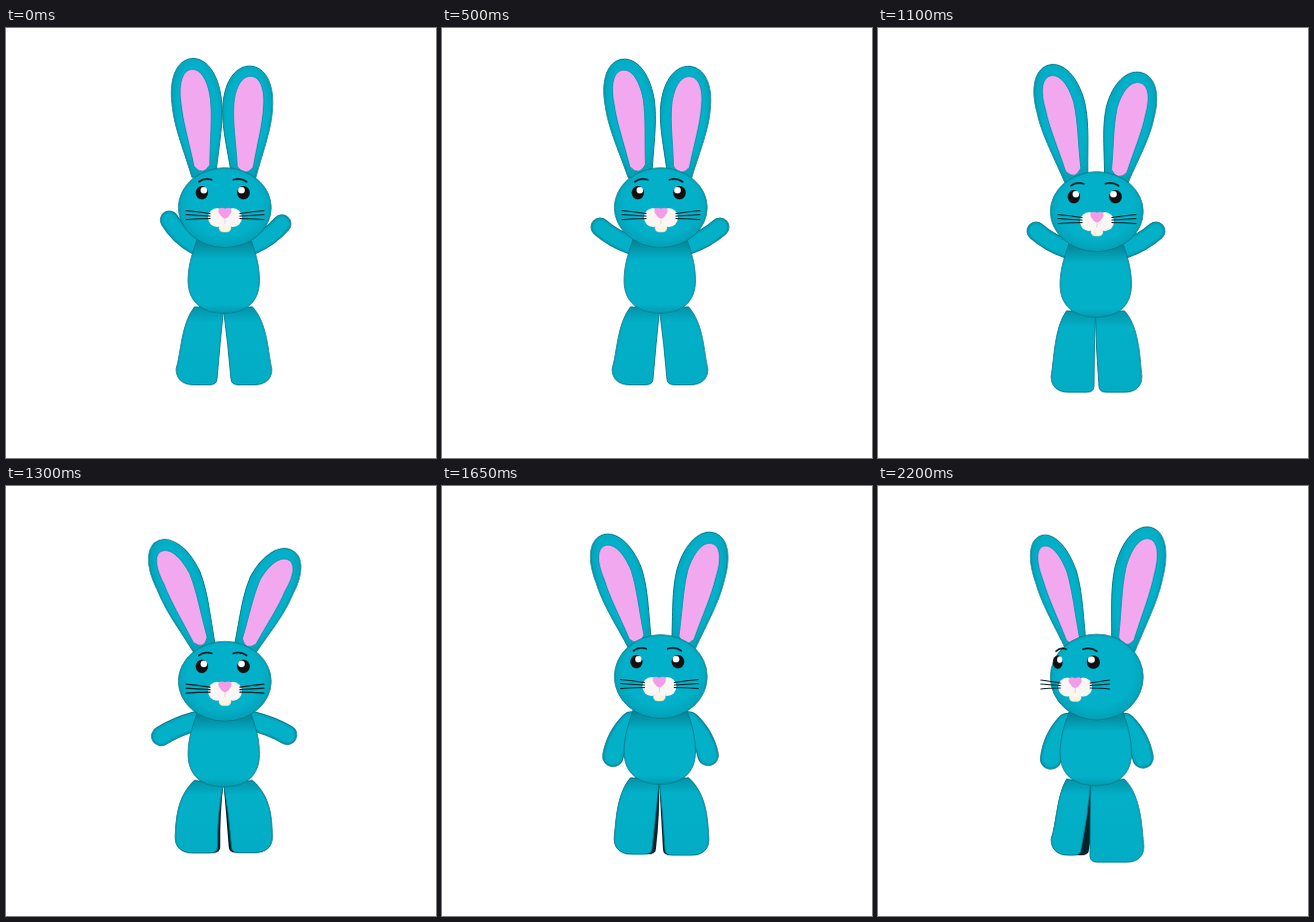
Recreate the animation shown at these times as an HTML page. Size 432 by 432 pixels, loop 3 s.

```html
<!DOCTYPE html>
<html lang="en">
<head>
<meta charset="utf-8">
<title>Plush rabbit</title>
<style>
  html, body { margin: 0; width: 100%; height: 100%; overflow: hidden; background: #fff; }
  svg { display: block; width: 100vw; height: 100vh; }
  .fur { stroke: #067a8b; stroke-width: .9; }
  .line { fill: none; stroke: #0b1c22; stroke-linecap: round; }
</style>
</head>
<body>
<svg viewBox="0 0 432 432" xmlns="http://www.w3.org/2000/svg">
  <defs>
    <radialGradient id="round" cx=".5" cy=".45" r=".56">
      <stop offset=".7" stop-color="#02b1c9"/><stop offset="1" stop-color="#039fb5"/>
    </radialGradient>
    <linearGradient id="under" x2="0" y2="1">
      <stop offset="0" stop-color="#057f92"/><stop offset=".27" stop-color="#02b0c8"/>
      <stop offset=".88" stop-color="#02b0c8"/><stop offset="1" stop-color="#039ab0"/>
    </linearGradient>
    <linearGradient id="leg" x2="0" y2="1">
      <stop offset="0" stop-color="#0492a7"/><stop offset=".2" stop-color="#02b0c8"/>
      <stop offset="1" stop-color="#02acc4"/>
    </linearGradient>
  </defs>
  <g id="rabbit"></g>
</svg>
<script>
const LOOP = 3000, STEP = 50, LAST = 2200;
const TIMES = [0, 500, 900, 1100, 1500, 1650, 1900, 2200];

// Shorter tracks belong to the last times and hold still before them.
const tracks = {
  drop:   [0, 4, 24.5, 13, 13.5, 14.5],
  headRy: [40, 40, 40, 42, 43, 43],
  yaw:    [0, 0, 0, -2, -9, -28],
  earL:   [-5.5, -8, -5.5, -12, -26.5, -17, -15.5, -16],
  earR:   [3.2, 4.8, 3.2, 11.5, 29.5, 13.5, 12.5, 11.5],
  earX:   [239, 240, 242, 243, 245, 247],
  earLen: [108, 108, 107, 116, 121, 122],
  armL:   [44, 30, 44, 30, -66, -62, -60, -65],
  armR:   [36, 30, 36, 30, -68, -60, -58, -62]
};
const legs = {
  left: {
    foot:  [171, 174, 166, 173, 175, 174],
    knee:  [176, 177, 165, 175, 177, 179.5],
    heel:  [212, 217, 208, 211, 211, 204],
    thigh: [215, 217, 207, 215, 218, 211],
    floor: [358.5, 366, 370, 370, 371, 371],
    shade: [0, 0, 5.5, 4, 6, 8]
  },
  right: {
    foot:  [267, 265, 270, 268, 269, 267],
    knee:  [263, 263, 271, 267, 268, 265],
    heel:  [226, 222, 231, 224, 221, 213],
    thigh: [223, 219, 229, 222, 221, 213],
    floor: [358.5, 366, 370, 371, 373, 378],
    shade: [0, 0, -5.5, -2, 0, 0]
  }
};

// Smooth interpolation that never overshoots its keys.
function sample(values, t) {
  const times = TIMES.slice(-values.length), last = values.length - 1;
  if (t <= times[0]) return values[0];
  if (t >= times[last]) return values[last];
  const slope = i => (values[i + 1] - values[i]) / (times[i + 1] - times[i]);
  const tangent = i => {
    if (i === 0 || i === last) return 0;
    const a = slope(i - 1), b = slope(i);
    return a * b > 0 ? 2 * a * b / (a + b) : 0;
  };
  const i = times.findIndex((_, k) => t < times[k + 1]);
  const h = times[i + 1] - times[i], u = (t - times[i]) / h, v = 1 - u;
  return values[i] * (1 + 2 * u) * v * v + values[i + 1] * u * u * (3 - 2 * u)
    + h * (tangent(i) * u * v * v - tangent(i + 1) * u * u * v);
}
const poseOf = (set, t) =>
  Object.fromEntries(Object.entries(set).map(([name, values]) => [name, sample(values, t)]));

const rad = deg => deg * Math.PI / 180;
const path = (d, attrs) => `<path d="${d}" ${attrs}/>`;
const ellipse = (x, y, rx, ry, attrs) => `<ellipse cx="${x}" cy="${y}" rx="${rx}" ry="${ry}" ${attrs}/>`;

// A leaning ear narrows and its tip bends outwards.
function ear(x, y, angle, len, shift, turn) {
  const squash = Math.cos(rad(angle)) * turn, tip = angle * .2, bow = tip * .6;
  const outer = `M-12 4C-19 ${-.26 * len} -25 ${-.42 * len} -25 ${-.62 * len}
    C${bow - 25} ${-.86 * len} ${tip - 14} ${-len} ${tip} ${-len}
    S${bow + 25} ${-.86 * len} 25 ${-.62 * len}C25 ${-.42 * len} 19 ${-.26 * len} 12 4Z`;
  const inner = `M-8 ${-.06 * len}C-11 ${-.3 * len} -15 ${-.45 * len} -15 ${-.63 * len}
    C${bow - 15} ${-.8 * len} ${tip - 9} ${-.905 * len} ${tip} ${-.905 * len}
    S${bow + 15} ${-.8 * len} 15 ${-.63 * len}C15 ${-.45 * len} 11 ${-.3 * len} 8 ${-.06 * len}Q0 ${.04 * len} -8 ${-.06 * len}Z`;
  return `<g transform="translate(${x} ${y}) rotate(${angle}) scale(${squash} 1)">
    ${path(outer, 'class="fur" fill="url(#round)"')}
    ${path(inner, `transform="translate(${shift})" fill="#f2a8ee" stroke="#0590a6" stroke-width=".8"`)}</g>`;
}

function arm(x, y, angle, side) {
  const s = Math.sin(rad(angle)), c = Math.cos(rad(angle)), low = Math.max(0, -s);
  const len = 36 + 3 * low, width = 18 + 3 * low, bend = 7 * s, top = y + 7 * low;
  const hx = x + side * c * len, hy = top - s * len;
  const cx = x + side * (c * len / 2 + s * bend), cy = top - s * len / 2 + c * bend;
  const d = `M${x} ${top}Q${cx} ${cy} ${hx} ${hy}`;
  const stroke = (color, w) => path(d, `fill="none" stroke="${color}" stroke-width="${w}" stroke-linecap="round"`);
  return stroke('#067a8b', width + 1) + stroke('#03a5bc', width - 1) + stroke('#02b0c8', width - 5);
}

function leg(p, side, hipX, hipY) {
  const { foot, knee, floor } = p, midY = (hipY + floor) / 2 - 4;
  const shape = shade => {
    const heel = p.heel + shade;
    return `M${hipX} ${hipY}Q${p.thigh + shade} ${midY} ${heel} ${floor - 6}
      Q${heel} ${floor} ${heel + side * 8} ${floor}L${foot - side * 18} ${floor}
      C${foot - side * 6} ${floor} ${foot} ${floor - 6} ${foot} ${floor - 16}
      C${knee} ${floor - 32} ${knee} ${hipY + 14} ${218.5 + side * 29} ${hipY - 3}Z`;
  };
  const dark = Math.abs(p.shade) > .3 ? path(shape(p.shade), 'fill="#06232b"') : '';
  return dark + path(shape(0), 'class="fur" fill="url(#leg)"');
}

function face(cy, yaw) {
  const project = deg => 220 + 46.5 * Math.sin(rad(yaw + deg));
  const eye = (deg, inward) => {
    const x = project(deg), squash = .45 + .55 * Math.cos(rad(yaw + deg));
    return `<g transform="translate(${x} ${cy - 15})">
      ${ellipse(0, 0, 6.7 * squash, 6.8, 'fill="#141012"')}
      ${ellipse(inward * 2, -2.5, 3.5 * squash, 3.3, 'fill="#fff"')}
      ${path('M-7 2Q-1 -2.5 7 0', `class="line" stroke-width="1.8" transform="translate(${inward * 3.5} -13) scale(${inward * squash} 1)"`)}</g>`;
  };
  const reach = 39 * Math.cos(rad(yaw));
  const whiskers = [-1, 1].map(side => [-4, -1.5, 1].map((y, i) => path(
    `M${side * 15} ${y}Q${side * 27} ${y - 2 + i} ${side * reach} ${[-7, -3, 2][i]}`,
    'class="line" stroke-width="1.2"')).join('')).join('');
  const white = 'fill="#faf6f4"';
  return eye(-30, 1) + eye(23.5, -1) + `<g transform="translate(${project(0)} ${cy + 10})">
    ${path('M-6 5H6V11Q5 14.500 2 14.500H-2Q-5 14.500 -6 11Z', 'fill="#fff3dc" stroke="#d8cdbb" stroke-width=".5"')}
    ${ellipse(-8, 0, 9, 9.5, white)}${ellipse(8, 0, 9, 9.5, white)}${ellipse(0, 2, 8, 7.5, white)}
    ${path('M0 1V6', 'fill="none" stroke="#d3c8c6" stroke-width=".7"')}
    ${path('M0 -9C5 -11 8 -8 6 -4.500Q3 .5 0 1Q-3 .5 -6 -4.500C-8 -8 -5 -11 0 -9Z', 'fill="#f49be8"')}
    ${whiskers}</g>`;
}

function draw(t) {
  const p = poseOf(tracks, t), d = p.drop, headY = 220.5 + d - p.headRy;
  const hipX = 218.5 + p.yaw * .17, hipY = 283 + d;
  const torso = 'M192 212C186 230 183 240 183 254C183 275 197 286.500 219 286.500S254.500 275 254.500 254C254.500 240 252 230 246 212Z';
  return leg(poseOf(legs.left, t), -1, hipX, hipY)
    + leg(poseOf(legs.right, t), 1, hipX, hipY)
    + arm(190, 218 + d, p.armL, -1)
    + arm(248, 218 + d, p.armR, 1)
    + path(torso, `class="fur" fill="url(#under)" transform="translate(0 ${d})"`)
    + ear(198.5, 145 + d, p.earL, 115, -1, Math.cos(rad(p.yaw)))
    + ear(p.earX, 146 + d, p.earR, p.earLen, 1, 1)
    + ellipse(219.8, headY, 46.5, p.headRy, 'class="fur" fill="url(#round)"')
    + face(headY, p.yaw);
}

const rabbit = document.getElementById('rabbit');
const start = performance.now();
let shown = -1;
function tick() {
  const elapsed = (performance.now() - start) % LOOP;
  const t = Math.min(LAST, Math.floor(elapsed / STEP) * STEP);
  if (t !== shown) rabbit.innerHTML = draw(shown = t);
  requestAnimationFrame(tick);
}
tick();
</script>
</body>
</html>
```
